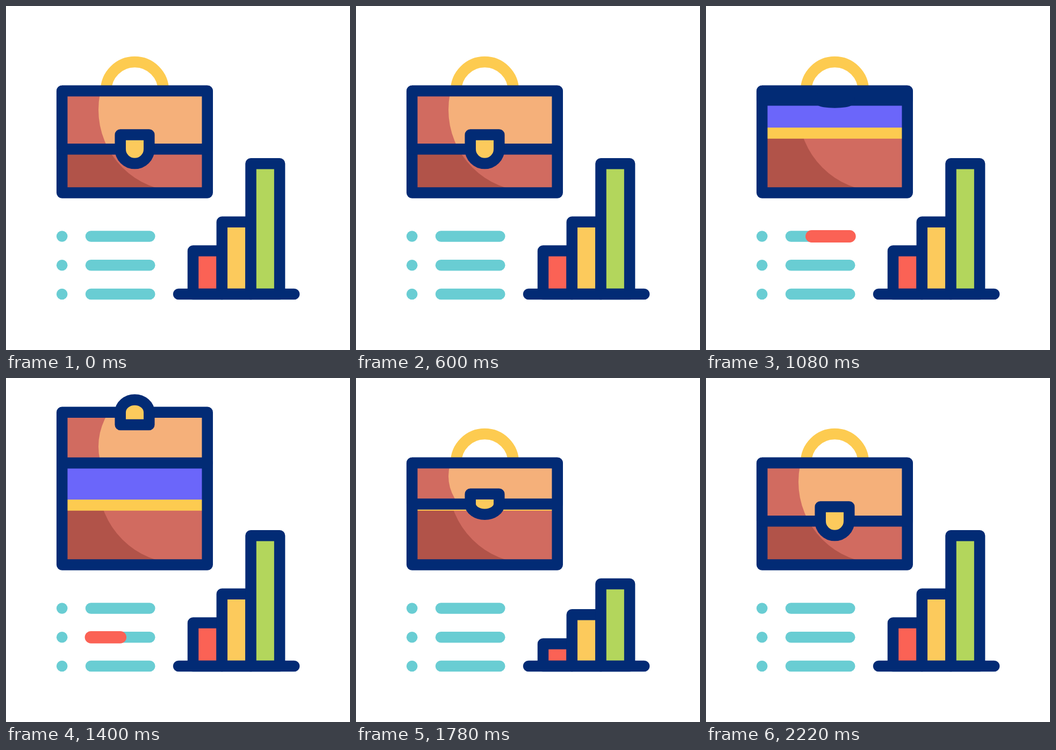
Write an HTML page with a canvas that moves like this. It is 640 px wide and 640 px high and loops after 2400 ms.

```html
<!DOCTYPE html>
<html lang="en">
<head>
<meta charset="utf-8">
<title>Briefcase and chart</title>
<style>
  html, body { margin: 0; width: 100%; height: 100%; overflow: hidden; background: #fff; }
  canvas { display: block; width: 100%; height: 100%; }
</style>
</head>
<body>
<canvas id="stage" width="640" height="640"></canvas>
<script>
const ctx = document.getElementById('stage').getContext('2d');
const LOOP = 2400, STEP = 20, LINE = 20.5;
const NAVY = '#022b75', GOLD = '#fdcb50', AMBER = '#fcca5c', RED = '#fb6255',
      GREEN = '#b3d65c', TEAL = '#69cdd3', PEACH = '#f5b07a', ROSE = '#d16b60',
      BRICK = '#b15349', VIOLET = '#6b66fa';

// Tracks of [time, value]; each stretch is eased at both ends.
const HOP = [[200, 0], [400, -31.9], [600, 0], [800, -31.9], [1000, 0]];
const LID = [[800, 1], [1400, -0.87], [1480, -0.87], [1880, 1]];
const DIP = [[1400, 0], [1800, 1], [2220, 0]];

const ROWS = [428.5, 482.3, 536];
const ROW_STARTS = [800, 1300, 1800];
const BARS = [
  { x: 348, top: 455.5, drop: 39.2, color: RED },
  { x: 401.8, top: 401.7, drop: 38.8, color: AMBER },
  { x: 455.5, top: 293.2, drop: 90.4, color: GREEN }
];
const BAR_WIDTH = 53.6, BASE = 536;
const LEFT = 104.2, RIGHT = 374.7, HINGE = 158, FLOOR = 347.5;

const ease = u => u * u * (3 - 2 * u);

function valueAt(track, t) {
  if (t <= track[0][0]) return track[0][1];
  for (let i = 1; i < track.length; i++) {
    const [t0, a] = track[i - 1], [t1, b] = track[i];
    if (t < t1) return a + (b - a) * ease((t - t0) / (t1 - t0));
  }
  return track[track.length - 1][1];
}

function fillRect(x0, y0, x1, y1, color) {
  ctx.fillStyle = color;
  ctx.fillRect(x0, y0, x1 - x0, y1 - y0);
}

function stroke(color, width = LINE) {
  ctx.strokeStyle = color;
  ctx.lineWidth = width;
  ctx.stroke();
}

function bar(x0, x1, y, color, width) {
  ctx.beginPath();
  ctx.moveTo(x0, y);
  ctx.lineTo(x1, y);
  stroke(color, width);
}

function box(x0, y0, x1, y1) {
  ctx.beginPath();
  ctx.rect(x0, y0, x1 - x0, y1 - y0);
}

// A panel in shade with a large round highlight.
function litPanel(y0, y1, shade, light) {
  ctx.save();
  box(LEFT, y0, RIGHT, y1);
  ctx.clip();
  fillRect(LEFT, y0, RIGHT, y1, shade);
  ctx.beginPath();
  ctx.arc(324, 193, 152, 0, Math.PI * 2);
  ctx.fillStyle = light;
  ctx.fill();
  fillRect(324, y0, RIGHT, y1, light);
  ctx.restore();
}

// Flips shapes about the hinge while strokes keep their weight.
function hinged(k, draw) {
  ctx.save();
  ctx.translate(0, HINGE);
  ctx.scale(1, k);
  ctx.translate(0, -HINGE);
  draw();
  ctx.restore();
}

function claspPath() {
  ctx.beginPath();
  ctx.moveTo(212.7, 239.6);
  ctx.lineTo(266.3, 239.6);
  ctx.lineTo(266.3, 266.3);
  ctx.arc(239.5, 266.3, 26.8, 0, Math.PI);
  ctx.closePath();
}

function drawCase(t) {
  const raw = valueAt(LID, t);
  const k = Math.abs(raw) < 0.002 ? 0.002 : raw;
  ctx.save();
  ctx.translate(0, valueAt(HOP, t));

  ctx.lineCap = 'butt';
  ctx.beginPath();
  ctx.arc(239.5, 157.5, 53.4, Math.PI, 0);
  stroke(GOLD);
  ctx.lineCap = 'round';

  fillRect(LEFT, HINGE, RIGHT, 236, VIOLET);
  litPanel(236, FLOOR, BRICK, ROSE);
  fillRect(LEFT, 226.2, RIGHT, 246.8, GOLD);
  box(LEFT, HINGE, RIGHT, FLOOR);
  stroke(NAVY);

  hinged(k, () => litPanel(HINGE, 266.2, ROSE, PEACH));
  box(LEFT, HINGE, RIGHT, HINGE + 108.2 * k);
  stroke(NAVY);
  hinged(k, claspPath);
  ctx.fillStyle = AMBER;
  ctx.fill();
  stroke(NAVY);
  ctx.restore();
}

function drawList(t) {
  const x0 = 158, x1 = 267.3;
  ROWS.forEach((y, i) => {
    ctx.beginPath();
    ctx.arc(104.2, y, 10.3, 0, Math.PI * 2);
    ctx.fillStyle = TEAL;
    ctx.fill();
    bar(x0, x1, y, TEAL);

    const s = ROW_STARTS[i];
    const head = valueAt([[s, x0], [s + 200, x1]], t);
    const tail = valueAt([[s + 200, x0], [s + 400, x1]], t);
    if (head - tail > 0.01) bar(tail, head, y, RED, 22.8);
  });
}

function drawChart(t) {
  const dip = valueAt(DIP, t);
  for (const { x, top, drop, color } of BARS) {
    box(x, top + drop * dip, x + BAR_WIDTH, BASE);
    ctx.fillStyle = color;
    ctx.fill();
    stroke(NAVY);
  }
  bar(321, 536.2, BASE, NAVY);
}

function draw(t) {
  fillRect(0, 0, 640, 640, '#fff');
  ctx.lineJoin = ctx.lineCap = 'round';
  drawList(t);
  drawChart(t);
  drawCase(t);
}

const start = performance.now();
function tick() {
  const t = (performance.now() - start) % LOOP;
  draw(Math.floor(t / STEP) * STEP);
  requestAnimationFrame(tick);
}
tick();
</script>
</body>
</html>
```
